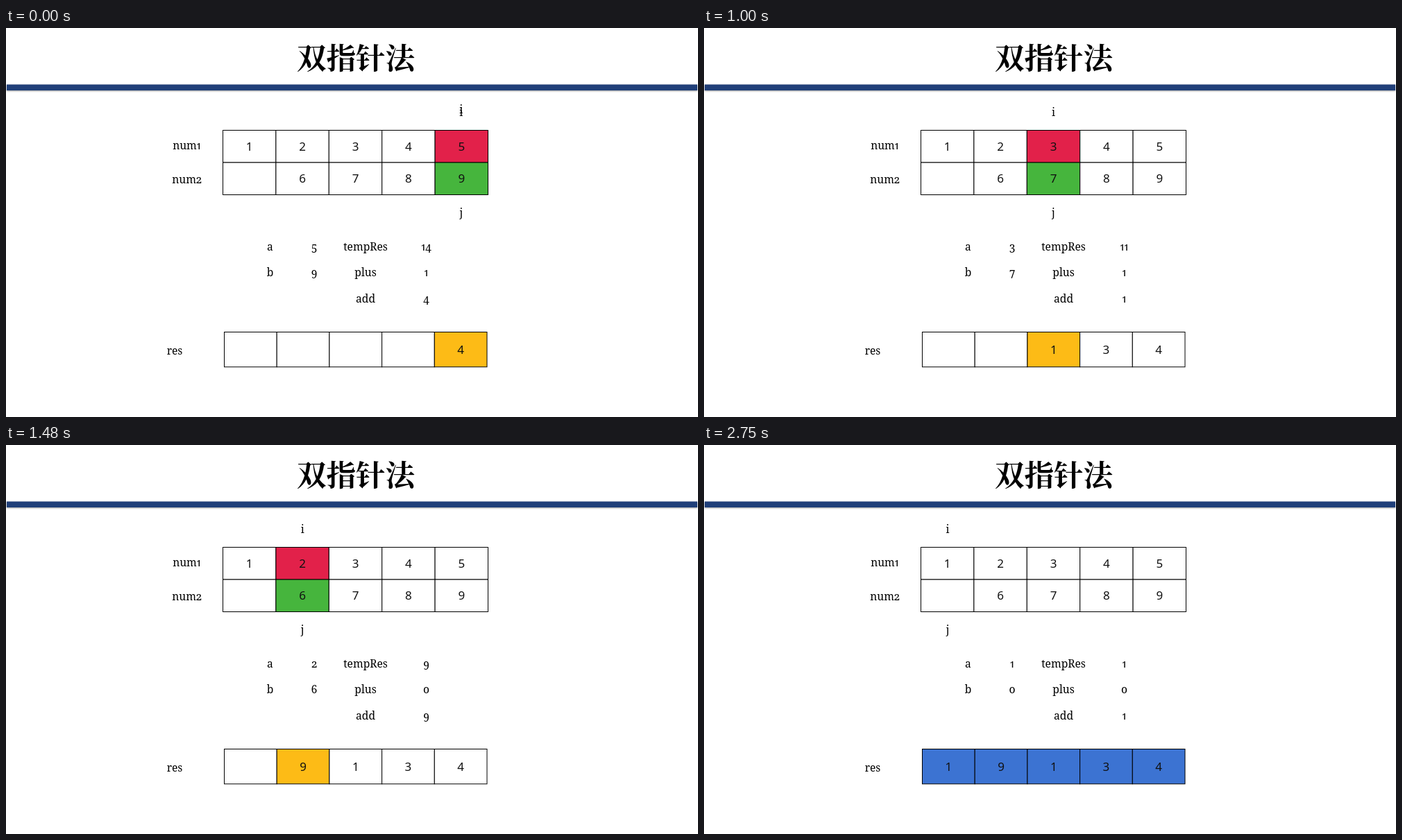
These frames come from a looping animation (997 px wide and 561 px high, 2.96 s). An HTML page:

```html
<!DOCTYPE html>
<html lang="zh-CN">
<head>
<meta charset="utf-8">
<style>
  html, body { margin: 0; width: 100%; height: 100%; overflow: hidden; background: #fff; }
  svg { display: block; width: 997px; height: 561px; }
  text { text-anchor: middle; font: 500 15.6px "Noto Serif", serif; font-variant-numeric: oldstyle-nums proportional-nums; }
  .title { font: 700 42.5px "Noto Serif CJK SC", "Noto Sans CJK SC", serif; }
  .digit { font: 400 17px "Noto Sans", sans-serif; fill: #111; }
  .bar { fill: #203f79; filter: drop-shadow(0 1px 1px #0006); }
  .cell { stroke: #000; stroke-width: 1; }
</style>
</head>
<body>
<svg viewBox="0 0 997 561">
  <text class="title" x="504" y="59">双指针法</text>
  <rect class="bar" x="1" y="81.5" width="995" height="8.5"/>
  <g id="scene"></g>
</svg>
<script>
const NUM1 = [1, 2, 3, 4, 5];
const NUM2 = ["", 6, 7, 8, 9];
const RED = "#e2214a", GREEN = "#46b53d", ORANGE = "#fdbb16", BLUE = "#3c73d2";
const LOOP = 2960, LAST = 5;
const scene = document.getElementById("scene");

const text = (value, x, y, cls = "") => `<text class="${cls}" x="${x}" y="${y}">${value}</text>`;

// One row of five cells; fillOf gives the colour of a column.
function row(values, x, y, w, h, fillOf) {
  return values.map((value, i) =>
    `<rect class="cell" x="${x + i * w}" y="${y}" width="${w}" height="${h}" fill="${fillOf(i)}"/>` +
    text(value, x + (i + 0.5) * w, y + h / 2 + 6, "digit")).join("");
}

// Adds the columns from the right up to and including col.
function addUpTo(col) {
  const res = ["", "", "", "", ""];
  let a, b, temp, plus = 0;
  for (let i = 4; i >= col; i--) {
    a = NUM1[i];
    b = +NUM2[i];
    temp = a + b + plus;
    plus = Math.floor(temp / 10);
    res[i] = temp % 10;
  }
  return { a, b, temp, plus, res };
}

function draw(step) {
  const done = step === LAST;
  const col = Math.max(0, 4 - step);
  const { a, b, temp, plus, res } = addUpTo(col);
  const mark = color => i => !done && i === col ? color : "#fff";
  const pointerX = 351 + col * 76.2;

  scene.innerHTML =
    (step ? text("i", pointerX, 127) : text("i", pointerX, 123) + text("i", pointerX, 127)) +
    text("j", pointerX, 272) +
    text("num1", 260.5, 175) + text("num2", 260.5, 223.5) + text("res", 243, 471) +
    row(NUM1, 312.5, 147.5, 76.4, 46.5, mark(RED)) +
    row(NUM2, 312.5, 194, 76.4, 46.5, mark(GREEN)) +
    text("a", 380.5, 320.5) + text(a, 444, 320.5) +
    text("b", 380.5, 358) + text(b, 444, 358) +
    text("tempRes", 518, 320.5) + text(temp, 605.5, 320.5) +
    text("plus", 518, 358) + text(plus, 605.5, 358) +
    text("add", 518, 396) + text(res[col], 605.5, 396) +
    row(res, 314.5, 438.5, 75.7, 50.3, done ? () => BLUE : mark(ORANGE));
}

let shown = -1;
function tick() {
  const t = performance.now() % LOOP;
  const step = t < 520 ? 0 : Math.min(LAST, 1 + Math.floor((t - 520) / 480));
  if (step !== shown) draw(shown = step);
  requestAnimationFrame(tick);
}
tick();
</script>
</body>
</html>
```
